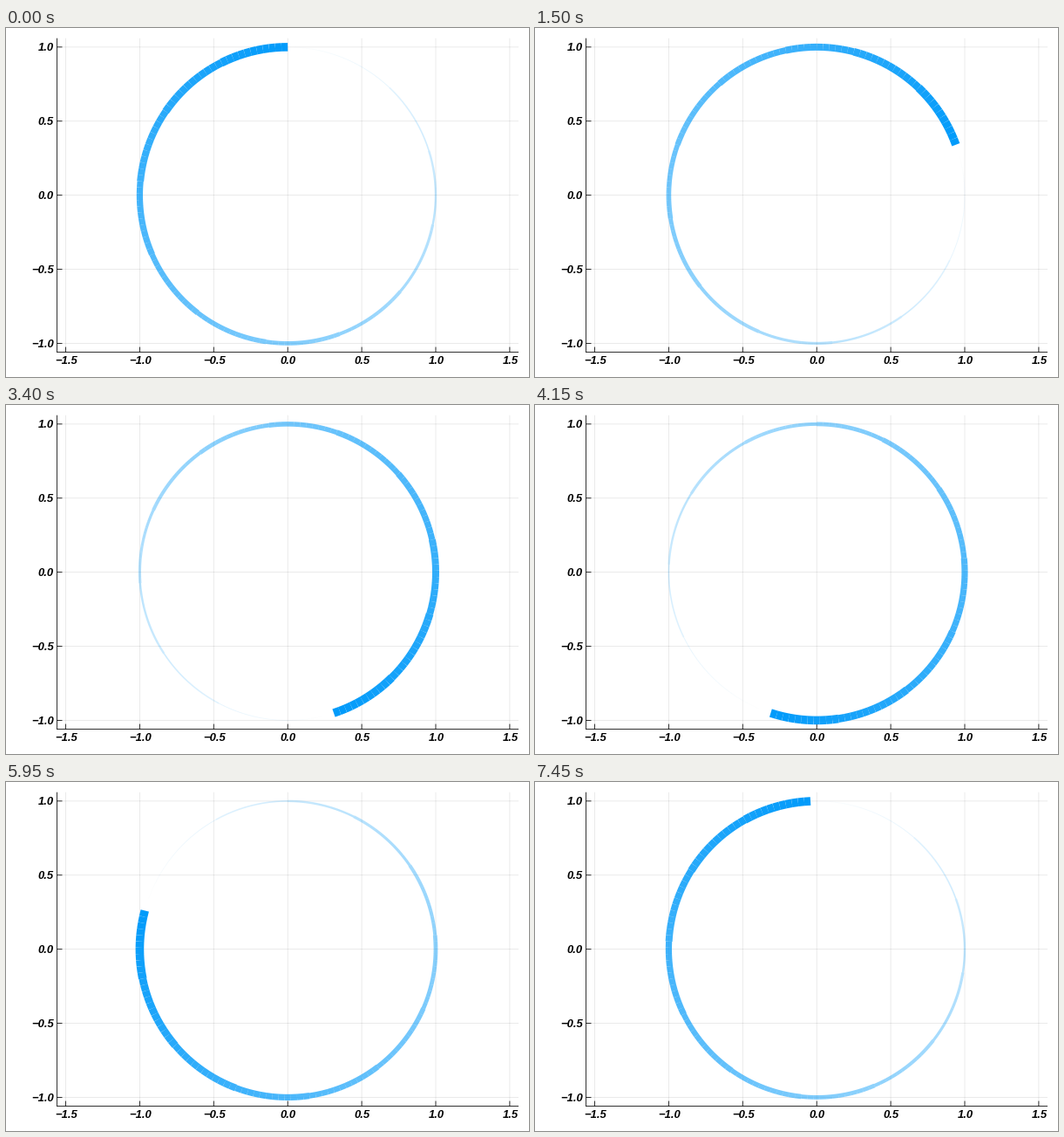
Animation of 600 by 400 pixels, one loop 7500 ms. Source, as a matplotlib script:

```python
import numpy as np
import matplotlib.pyplot as plt
from matplotlib.animation import FuncAnimation
from matplotlib.collections import LineCollection

W, H, DPI = 600, 400, 100
PX = 72 / DPI                     # one pixel in points
PEN = 0.8                         # line widths are whole multiples of this
N = 150                           # points on the circle, also frames
CX, CY, UNIT = 323.2, 191.65, 169.8
LEFT, RIGHT, TOP, BOTTOM = 58.5, 588, 11.7, 371.6
TICK = 6


def to_px(x, y):
    return CX + UNIT * x, CY - UNIT * y


def pen_width(w):
    return PEN * np.maximum(1, np.round(w / PEN))


fig = plt.figure(figsize=(W / DPI, H / DPI), dpi=DPI, facecolor="white")
ax = fig.add_axes([0, 0, 1, 1])
ax.set_xlim(0, W)
ax.set_ylim(H, 0)
ax.axis("off")


def rule(x0, y0, x1, y1, alpha=1.0, z=1):
    ax.plot([x0, x1], [y0, y1], color="black", alpha=alpha, lw=PEN * PX,
            solid_capstyle="butt", snap=False, zorder=z)


def label(x, y, value, ha):
    ax.text(x, y, f"{value:.1f}".replace("-", "\u2212"), ha=ha, va="baseline",
            family="Liberation Sans", style="italic", weight="bold",
            size=13 * PX)


for v in np.arange(-1.5, 1.6, 0.5):
    x, _ = to_px(v, 0)
    rule(x, TOP, x, BOTTOM, alpha=0.1)
    rule(x, BOTTOM, x, BOTTOM - TICK, z=2)
    label(x + 0.8, 385, v, "center")

for v in np.arange(-1, 1.1, 0.5):
    _, y = to_px(0, v)
    rule(LEFT, y, RIGHT, y, alpha=0.1)
    rule(LEFT, y, LEFT + TICK, y, z=2)
    label(54.5, y + 4.6, v, "right")

rule(LEFT, TOP, LEFT, BOTTOM + PEN / 2, z=2)
rule(LEFT, BOTTOM, RIGHT, BOTTOM, z=2)

t = np.linspace(0, 2 * np.pi, N)
circle = np.column_stack(to_px(np.sin(t), np.cos(t)))

ramp = np.linspace(0, 1, N)[:-1]
colors = np.zeros((N - 1, 4))
colors[:, :3] = np.array([0, 154, 250]) / 255
colors[:, 3] = ramp
trail = LineCollection([], linewidths=pen_width(10 * ramp) * PX,
                       colors=colors, capstyle="butt", zorder=3)
trail.set_snap(False)
ax.add_collection(trail, autolim=False)


def update(i):
    pts = np.roll(circle, -i, axis=0)
    trail.set_segments(np.stack([pts[:-1], pts[1:]], axis=1))
    return [trail]


anim = FuncAnimation(fig, update, frames=N, init_func=lambda: update(0),
                     interval=50, repeat=True, repeat_delay=0)
plt.show()
```
